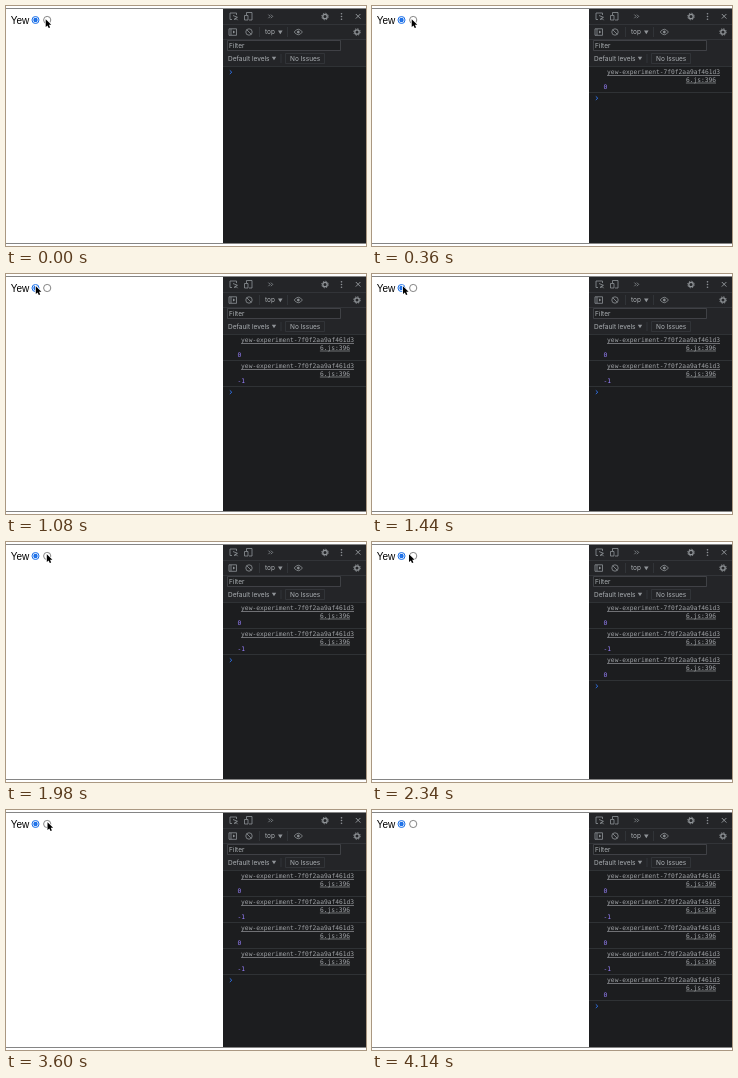
These frames come from a looping animation (360x240 px, 4320 ms). An HTML page:

```html
<!DOCTYPE html>
<html lang="en">
<head>
<meta charset="utf-8">
<title>Radio buttons and console</title>
<style>
html, body { margin: 0; width: 100%; height: 100%; overflow: hidden; background: #fff; }
svg { display: block; width: 360px; height: 240px; }
.page { font: 10px "Liberation Sans", Arial, sans-serif; }
.ui { font: 6.5px Inter, sans-serif; fill: #acb0b4; }
.icon { fill: none; stroke: #8f9397; stroke-width: .8; }
.line { fill: none; stroke: #393b3f; stroke-width: .7; }
.log { font: 6.26px "DejaVu Sans Mono", monospace; }
.link { fill: #a0a3a7; text-decoration: underline; text-anchor: end; }
.value { fill: #9980ff; }
</style>
</head>
<body>
<svg viewBox="0 0 360 240">
  <defs>
    <g id="gear" fill="none" stroke="#8f9397">
      <circle r="2.2" stroke-width="1.3"/>
      <circle r="3.3" stroke-width=".9" stroke-dasharray="1.3 1.292"/>
    </g>
  </defs>

  <path d="M0 2.5H360M0 237.5H360" stroke="#858585"/>
  <text class="page" x="4.8" y="17.8">Yew</text>
  <g fill="none" stroke="#1a6fe8">
    <circle cx="29.5" cy="14" r="3.5"/>
    <circle cx="29.5" cy="14" r="1.2" stroke-width="2"/>
  </g>
  <circle cx="41.2" cy="14" r="3.6" fill="none" stroke="#767676" stroke-width=".9"/>

  <path d="M217 3H360V237H217Z" fill="#1c1d1f"/>
  <path d="M217 3H360V60H217Z" fill="#242528"/>
  <path class="line" d="M217 18.5H360M217 33.5H360M217 60.5H360"/>

  <g class="icon">
    <path d="M226 13.5H224V7H230.5V9M227 9.5L231.5 11.3 229.6 12 231.6 14.2M229.4 12L228.7 14Z"/>
    <path d="M240.5 9V6.5H246V14H243M238.5 9.5H242V14H238.5Z"/>
    <path d="M262.4 8.6L264.2 10.4 262.4 12.2M264.9 8.6L266.7 10.4 264.9 12.2"/>
    <path d="M349.8 8L354.4 12.6M354.4 8L349.8 12.6" stroke-width="1"/>
    <path d="M223 22.8H230.5V29.3H223ZM225 23V29"/>
    <path d="M227 24.5L229.3 26 227 27.5Z" fill="#8f9397" stroke="none"/>
    <circle cx="243" cy="26" r="3.2"/>
    <path d="M240.8 23.8L245.2 28.2"/>
    <path d="M288.2 26Q292.3 20.5 296.4 26 292.3 31.5 288.2 26Z"/>
    <circle cx="292.3" cy="26" r="1" fill="#8f9397"/>
  </g>
  <g fill="#8f9397">
    <circle cx="335.5" cy="7.7" r=".8"/>
    <circle cx="335.5" cy="10.5" r=".8"/>
    <circle cx="335.5" cy="13.3" r=".8"/>
    <path d="M272 24.4H276.6L274.3 28.2ZM265.8 50.7H270.2L268 54.3Z"/>
  </g>
  <use href="#gear" x="319" y="10.5"/>
  <use href="#gear" x="351" y="26"/>
  <path class="line" d="M253.5 21V31M281.5 21V31M275 48V57"/>
  <path class="line" d="M279.5 47.5H318.5V57.5H279.5Z"/>
  <path d="M221.5 34.5H334.5V44.5H221.5Z" fill="#1f2022" stroke="#484a4e" stroke-width=".8"/>
  <g class="ui">
    <text x="259" y="28.3">top</text>
    <text x="223" y="42">Filter</text>
    <text x="222" y="55">Default levels</text>
    <text x="284" y="55">No Issues</text>
  </g>

  <g id="logs" class="log"></g>
  <path id="prompt" d="M223.8 64.4L225.8 66.2 223.8 68" fill="none" stroke="#2f6fe0"/>
  <path id="cursor" d="M0 0V7.8L1.8 6.2 3 8.9 4.4 8.3 3.2 5.6H5.6Z" stroke="#fff" stroke-width="1.5" paint-order="stroke"/>
</svg>
<script>
const STEP = 180, LOOP = 4320, PITCH = 26;
const logTimes = [360, 1080, 2160, 2880, 3780];
const HIDE = 3960;
// time, x, y of the pointer tip
const path = [
  [0, 39.7, 13.2], [360, 39.7, 13.2], [540, 38, 13], [720, 32, 12.5], [900, 29.8, 12.2],
  [1260, 29.8, 12.2], [1440, 31, 12.2], [1620, 36, 12.2], [1800, 40.8, 12.2], [2160, 40.8, 12.2],
  [2340, 37, 12.2], [2520, 31, 12.2], [2700, 28.8, 12.2], [3060, 28.8, 12.2],
  [3240, 33, 12.2], [3420, 39, 12.2], [3600, 41.5, 12.2], [HIDE, 41.5, 12.2]
];
const $ = id => document.getElementById(id);

const entries = logTimes.map((time, i) => {
  $("logs").insertAdjacentHTML("beforeend", `<g transform="translate(0 ${i * PITCH})">
    <text class="link" x="348" y="68.3">yew-experiment-7f0f2aa9af461d3</text>
    <text class="link" x="344" y="75.7">6.js:396</text>
    <text class="value" x="231.5" y="83.4">${i % 2 ? "-1" : "0"}</text>
    <path class="line" d="M217 86.5H360"/></g>`);
  return $("logs").lastElementChild;
});

function pointer(t) {
  const i = path.findIndex(p => p[0] > t);
  if (i < 0) return path[path.length - 1].slice(1);
  const [t0, x0, y0] = path[i - 1], [t1, x1, y1] = path[i];
  const k = (t - t0) / (t1 - t0);
  return [x0 + (x1 - x0) * k, y0 + (y1 - y0) * k];
}

function draw(now) {
  const t = Math.floor(now % LOOP / STEP) * STEP;
  const [x, y] = pointer(t);
  const count = logTimes.filter(time => time <= t).length;
  entries.forEach((entry, i) => entry.setAttribute("visibility", i < count ? "visible" : "hidden"));
  $("prompt").setAttribute("transform", `translate(0 ${count * PITCH})`);
  $("cursor").setAttribute("transform", `translate(${x} ${y})`);
  $("cursor").setAttribute("visibility", t < HIDE ? "visible" : "hidden");
  requestAnimationFrame(draw);
}
requestAnimationFrame(draw);
</script>
</body>
</html>
```
